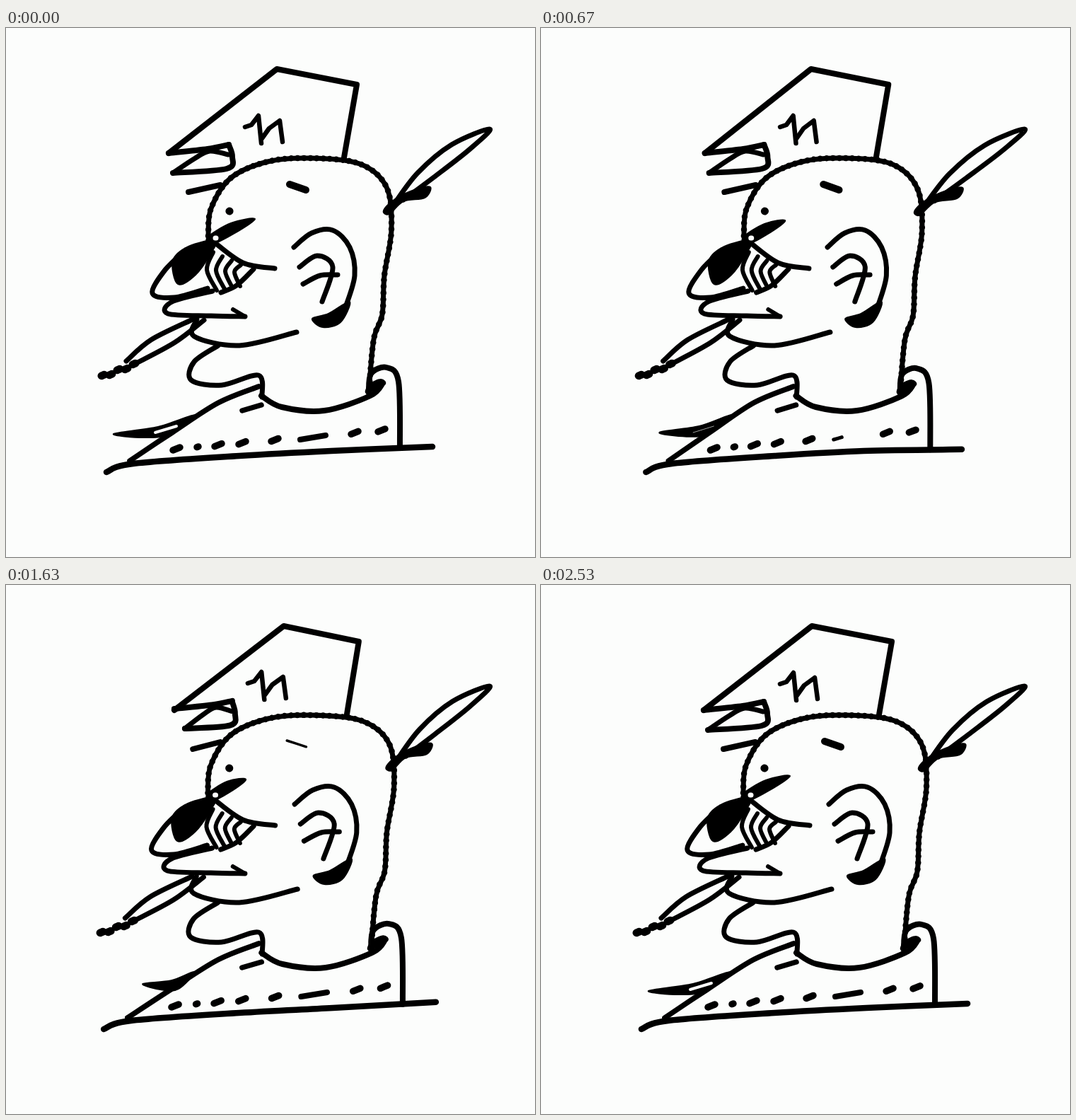
Recreate the animation shown at these times as an HTML page with a canvas. Size 748x748 px, loop 2560 ms.

```html
<!DOCTYPE html>
<html lang="en">
<head>
<meta charset="utf-8">
<title>Inked man in a cap</title>
<style>
html, body { margin: 0; width: 748px; height: 748px; overflow: hidden; background: #fcfdfc; }
canvas { display: block; }
</style>
</head>
<body>
<canvas id="stage" width="748" height="748"></canvas>
<script>
const ctx = document.getElementById('stage').getContext('2d');
const LOOP = 2560, PAPER = '#fcfdfc', INK = '#000';

const clamp = u => Math.max(0, Math.min(1, u));
const ramp = (t, from, to) => {
  const u = clamp((t - from) / (to - from));
  return u * u * (3 - 2 * u);
};
// Rises over a..b and falls back over c..d.
const swell = (t, a, b, c, d) => ramp(t, a, b) - ramp(t, c, d);

const poseAt = t => ({
  sway: 2 * ramp(t, 1070, 1630) - 1.25 * ramp(t, 0, 600) - .75 * ramp(t, 2170, LOOP),
  hat: swell(t, 670, 1630, 1630, LOOP),
  brow: swell(t, 270, 1070, 1630, 2350),
  wing: swell(t, 270, 1630, 1630, 2350),
  button: swell(t, 0, 1070, 1070, 1630),
  smudge: swell(t, 900, 1630, 1900, LOOP)
});
let pose;

// Widens and narrows the whole figure around its middle.
const sway = (x, y) => {
  const stretch = x > 345 || y > 540 ? .025 : .012;
  return [
    x + pose.sway * stretch * (x - 345),
    y - pose.sway * .03 * Math.max(0, x - 500)
  ];
};
// Moves points by (dx, dy), fully at a distance of span left of the pivot.
const slide = (name, dx, dy, pivot, span) => x => {
  const amount = pose[name] * clamp((pivot - x) / span);
  return [dx * amount, dy * amount];
};
const still = () => [0, 0];

const parse = text => text.split(' ').map(pair => pair.split(',').map(Number));
const line = (width, text, move = still, extra) =>
  ({ width, points: parse(text), move, bend: 1 / 6, ...extra });
const blob = (text, move) => line(2, text, move, { fill: true });
const dash = (x, y, half, width, move) =>
  line(width, `${x - half},${y + half * .4} ${x + half},${y - half * .4}`, move);

const crown = slide('hat', 9, 0, 496, 113);
const visor = slide('hat', 18, -2, 345, 110);
const badge = slide('hat', 4, -1, 500, 100);
const feather = slide('sway', -8.5, 5.5, 545, -139);
const wing = slide('wing', 45, -10, 268, 113);
const button = slide('button', -36, 4, 418, -36);

const cap = [
  line(8, '230,177 383,58 496,80 478,183', crown, { bend: 0 }),
  line(8, '230,177 285,171 315,165', slide('hat', 9, -2, 430, 200)),
  line(8, '315,165 320,182 312,199 236,205', visor),
  line(7, '236,205 266,185 288,174 314,179', visor),
  line(8, '258,232 303,222', slide('hat', 7, 0, 305, 47)),
  line(6.5, '338,140 347,137 357,124 361,163', badge, { bend: 0 }),
  line(6.5, '362,156 372,142 387,131 391,161', badge, { bend: 0 })
];

const head = [
  line(7, '286,294 290,255 318,212 370,189 430,184 500,192 538,225 545,285 535,350 532,405 520,440 513,515', still, { rough: true }),
  line(() => 10 - 6.5 * pose.smudge, '401,221 424,229', slide('smudge', -5, -1, 430, 30)),
  dash(316, 259, .1, 11),
  blob('285,296 318,276 352,270 320,292 292,305', slide('brow', -13, 5, 300, -50)),
  line(7, '407,310 432,290 462,286 486,310 493,350 480,395'),
  blob('433,411 456,404 486,387 473,416 448,423'),
  line(7, '415,338 440,322 462,338 447,387'),
  line(7, '420,362 444,350 469,349')
];

const face = [
  blob('296,300 258,309 236,329 243,362 268,349 290,318'),
  line(7, '254,314 225,342 207,375 238,381 285,368'),
  line(7, '292,301 335,332 380,340'),
  line(7, '304,374 326,364 350,341'),
  line(7, '296,297 297,297', still, { paper: true }),
  line(7, '292,372 235,387 229,404 290,407 338,408'),
  line(6, '321,398 338,408'),
  line(7, '270,412 266,436 330,449 411,430'),
  line(7, '300,449 266,472 262,498 305,505 357,491 362,522')
];
for (let i = 0; i < 4; i++) {
  const x = 284 + 13 * i;
  face.push(line(6, `${x + 9},${317 + 6 * i} ${x},${342 + i} ${x + 14 - 2 * i},${371 - 2 * i}`));
}

const cigarette = [
  line(7, '264,412 205,441 170,471'),
  line(7, '280,413 238,445 182,475')
];
for (let i = 0; i < 5; i++) {
  cigarette.push(dash(137 + 11 * i, 491 - 4 * i + 3 * (i % 2), 2, 11));
}

const quill = [
  line(7, '548,250 582,205 630,165 684,143 655,172 605,211 562,243', feather),
  blob('534,258 542,263 562,245 592,240 600,225 580,228 550,242', feather)
];

const coat = [
  line(8, '361,520 390,536 450,541 515,520 533,502'),
  line(8, '513,516 516,489 538,480 555,500 557,594'),
  blob('510,516 514,504 530,497 535,504'),
  line(7.5, '357,507 300,530 235,572 175,612'),
  line(7.5, '334,541 361,533'),
  line(8.5, '142,628 180,616 330,605 460,598 603,592'),
  blob('152,574 215,564 268,547 232,574 195,579', wing),
  line(() => 4 * clamp(1 - 4 * pose.wing), '211,572 241,563', still, { paper: true }),
  line(() => 8 * clamp(2 - 2 * pose.button), '416,582 452,576', button)
];
for (const x of [241, 271, 300, 334, 380, 493, 531]) {
  coat.push(dash(x, 595 - .09 * (x - 241), x === 271 ? 1 : 5, 9.5));
}

const parts = [cap, head, quill, face, cigarette, coat].flat();

// Smooth curve through the points; a bend of 0 gives straight edges.
function trace(points, bend, closed) {
  const n = points.length;
  const at = i => points[closed ? (i + n) % n : Math.max(0, Math.min(n - 1, i))];
  ctx.beginPath();
  ctx.moveTo(...points[0]);
  for (let i = 0; i < n - !closed; i++) {
    const [a, b, c, d] = [at(i - 1), at(i), at(i + 1), at(i + 2)];
    ctx.bezierCurveTo(
      b[0] + (c[0] - a[0]) * bend, b[1] + (c[1] - a[1]) * bend,
      c[0] - (d[0] - b[0]) * bend, c[1] - (d[1] - b[1]) * bend, ...c);
  }
}

function draw({ points, width, move, bend, fill, paper, rough }) {
  const w = typeof width === 'function' ? width() : width;
  if (w < .1) return;
  trace(points.map(([x, y]) => {
    const [sx, sy] = sway(x, y), [dx, dy] = move(x);
    return [sx + dx, sy + dy];
  }), bend, fill);
  ctx.fillStyle = ctx.strokeStyle = paper ? PAPER : INK;
  if (fill) ctx.fill();
  ctx.lineWidth = w;
  ctx.stroke();
  if (!rough) return;
  ctx.setLineDash([.1, 9]);
  ctx.lineWidth = w + 1.5;
  ctx.stroke();
  ctx.setLineDash([]);
}

function render() {
  pose = poseAt(performance.now() % LOOP);
  ctx.fillStyle = PAPER;
  ctx.fillRect(0, 0, 748, 748);
  ctx.lineCap = ctx.lineJoin = 'round';
  parts.forEach(draw);
  requestAnimationFrame(render);
}
render();
</script>
</body>
</html>
```
